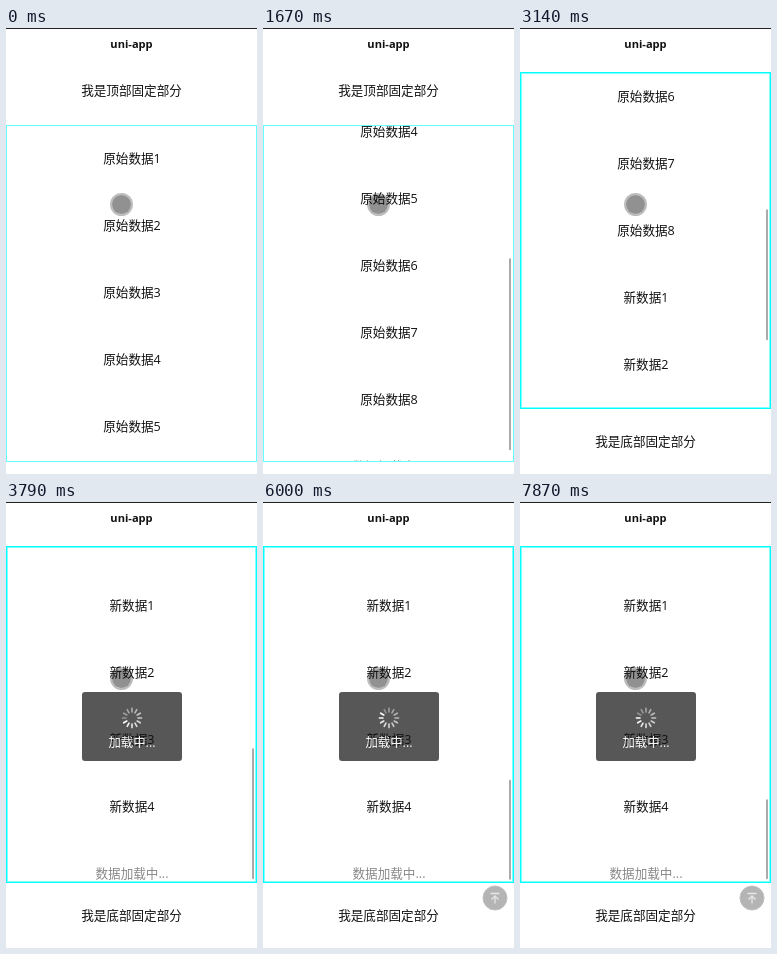
An HTML page that plays this animation: 251x446 px, repeating every 7990 ms.

```html
<!DOCTYPE html>
<html lang="zh">
<head>
<meta charset="utf-8">
<title>uni-app</title>
<style>
  html, body { margin: 0; width: 100%; height: 100%; overflow: hidden; background: #fff; }
  body { position: relative; font: 12.6px/67px "Open Sans", "Noto Sans CJK SC", "Noto Sans CJK", sans-serif; color: #111; text-align: center; }
  #stage { position: absolute; left: 0; top: 0; width: 251px; height: 446px; overflow: hidden; }
  #stage div, #stage svg { position: absolute; box-sizing: border-box; }
  #nav { left: 0; top: 0; width: 251px; height: 30px; background: #fff; border-top: 1px solid #222; font-size: 11.1px; line-height: 30px; font-weight: 700; }
  #page { left: 0; top: 30px; width: 251px; height: 471px; }
  .fixed { left: 0; width: 251px; height: 67px; }
  #box { left: 0; top: 67px; width: 251px; height: 337px; border: 1px solid #6ff; overflow: hidden; }
  #box.low { border-color: #0ff; box-shadow: inset 0 0 0 1px rgba(0,255,255,.5); }
  #list { left: 0; top: -1px; width: 250px; }
  #list div { left: 0; width: 100%; height: 67px; }
  #list .more { color: #888; }
  #bar { left: 245px; top: 0; width: 2px; border-radius: 1px; background: #aaa; }
  #touch { left: 104px; top: 165px; width: 23px; height: 23px; border-radius: 50%; background: rgba(0,0,0,.43); background-clip: padding-box; border: 2px solid rgba(0,0,0,.26); }
  #toast { left: 76px; top: 190px; width: 100px; height: 69px; border-radius: 3px; background: rgba(17,17,17,.7); color: #fff; }
  #toast div { left: 0; top: 41px; width: 100%; line-height: 20px; font-size: 12.4px; }
  #toast svg { left: 38px; top: 14px; }
  #up { left: 219px; top: 383px; }
</style>
</head>
<body>
<div id="stage">
  <div id="page">
    <div class="fixed" style="top:-1px">我是顶部固定部分</div>
    <div id="box"><div id="list"></div><div id="bar"></div></div>
    <div class="fixed" style="top:403px">我是底部固定部分</div>
  </div>
  <div id="nav">uni-app</div>
  <svg id="up" width="26" height="26" fill="none" stroke="#e6e6e6" stroke-width="1.3">
    <circle cx="13" cy="13" r="12" fill="#b4b4b4" stroke="#c0c0c0" stroke-width="1"/>
    <path d="M8.5 8.5H17.5M13 18.5V11M9.5 14.5L13 11L16.5 14.5"/>
  </svg>
  <div id="touch"></div>
  <div id="toast">
    <svg width="24" height="24" viewBox="-12 -12 24 24"><g id="spin" stroke="#fff" stroke-width="1.6" stroke-linecap="round"></g></svg>
    <div>加载中...</div>
  </div>
</div>
<script>
const LOOP = 7990, ROW = 67, VIEW = 335, TRACK = 331, TAIL = 41;
const FIRST = 8, BATCH = 4;       // rows at the start, rows per load
const NOTCH = 130, LOAD = 1125;   // ms for one wheel notch and for one load
const TICK = 135.3, PHASE = 943;  // the screen refreshes in coarse ticks
const $ = id => document.getElementById(id);
const clamp = x => Math.max(0, Math.min(1, x));

// wheel bursts: start, notches, gap; four notches reach the end of each batch
const bursts = [[839, 3, 135], [1567, 1, 0], [2820, 4, 220], [4954, 1, 0], [5290, 3, 135], [6848, 4, 247]];
const notches = bursts.flatMap(([at, n, gap]) => Array.from({ length: n }, (_, i) => at + i * gap));
const stages = [0, 1, 2, 3].map(g => notches.slice(g * 4, g * 4 + 4));
const loads = stages.map(s => s[3] + NOTCH);

const listHeight = count => count * ROW + TAIL;

function offset(t) {
  return stages.reduce((sum, times, g) => {
    const span = g ? BATCH * ROW : listHeight(FIRST) - VIEW;
    const turned = times.reduce((n, at) => n + clamp((t - at) / NOTCH), 0);
    return sum + Math.min(span, turned * ROW);
  }, 0);
}

function addRow(text, top, cls) {
  const row = document.createElement('div');
  row.textContent = text;
  row.className = cls || '';
  row.style.top = top + 'px';
  $('list').append(row);
  return row;
}

const rows = Array.from({ length: FIRST + 3 * BATCH }, (_, i) =>
  addRow(i < FIRST ? '原始数据' + (i + 1) : '新数据' + (i % BATCH + 1), i * ROW));
const more = addRow('数据加载中...', 0, 'more');

$('spin').innerHTML = Array.from({ length: 12 }, (_, i) =>
  `<path d="M0 -6V-9.6" transform="rotate(${i * 30})" opacity="${(0.35 + i * 0.059).toFixed(2)}"/>`).join('');

function draw(time) {
  const t = PHASE + Math.floor((time - PHASE) / TICK) * TICK;
  const y = offset(t);
  const page = Math.round(53 * clamp((t - loads[0] - 130) / 300));
  const count = FIRST + BATCH * loads.filter(at => at + LOAD <= t).length;
  const height = listHeight(count);
  const still = t - NOTCH - Math.max(0, ...notches.filter(at => at <= t));

  $('page').style.transform = `translateY(${-page}px)`;
  $('box').className = page ? 'low' : '';
  $('list').style.transform = `translateY(${-Math.round(y)}px)`;
  rows.forEach((row, i) => row.style.display = i < count ? '' : 'none');
  more.style.top = count * ROW + 'px';

  const bar = $('bar').style;
  bar.height = TRACK * VIEW / height + 'px';
  bar.transform = `translateY(${1.5 + y * TRACK / height}px)`;
  bar.opacity = y ? clamp((700 - still) / 250) : 0;

  $('up').style.display = y > 510 ? '' : 'none';
  $('toast').style.display = loads.some(at => t >= at && t < at + LOAD) ? '' : 'none';
  $('spin').setAttribute('transform', `rotate(${Math.floor(t * 12 / 1000) * 30 % 360})`);
}

let start;
function tick(now) {
  start ??= now;
  draw((now - start) % LOOP);
  requestAnimationFrame(tick);
}
draw(0);
requestAnimationFrame(tick);
</script>
</body>
</html>
```
